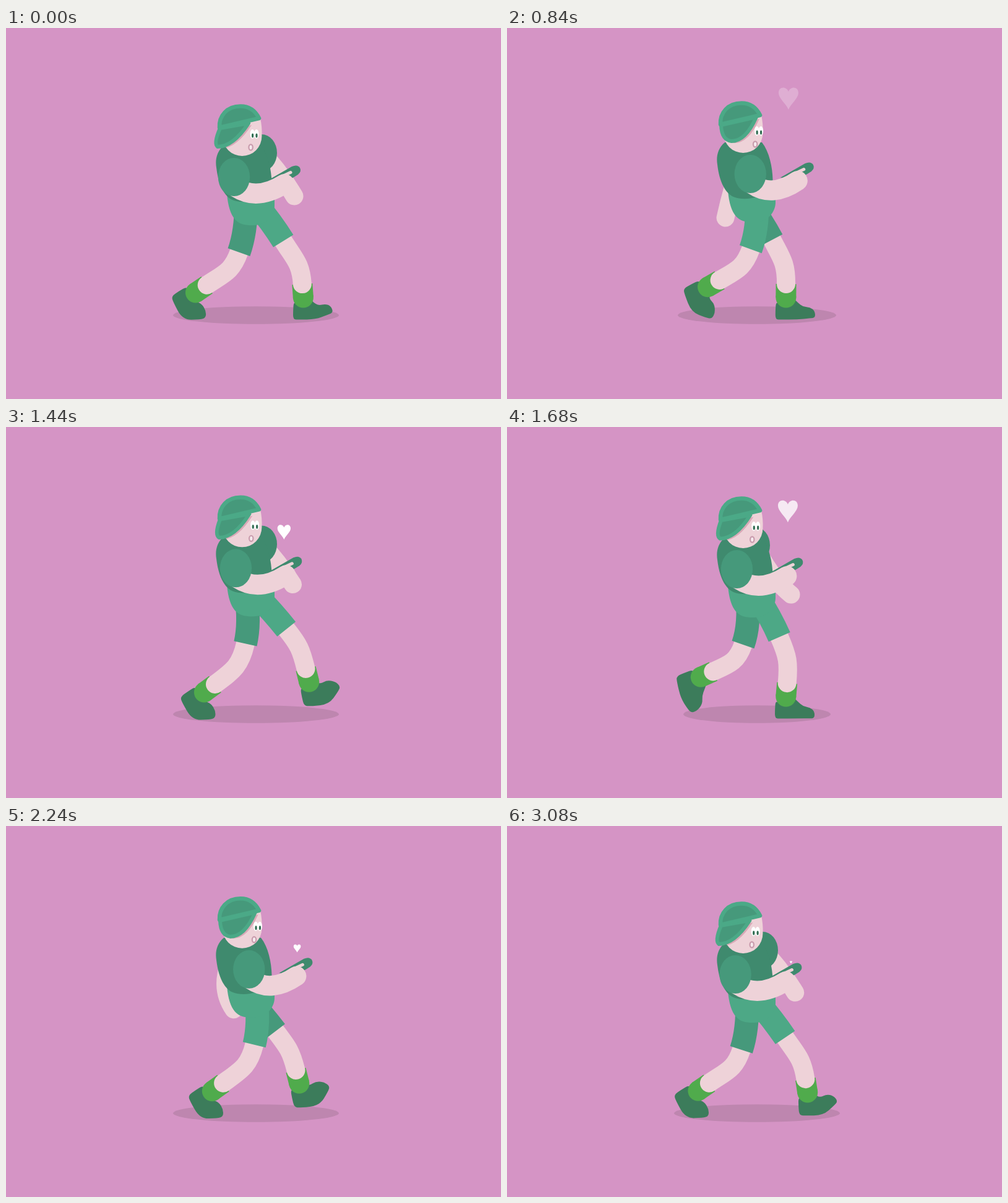
Animation of 800 by 600 pixels, one loop 3120 ms. Source, as an HTML page:

```html
<!DOCTYPE html>
<html lang="en">
<head>
<meta charset="utf-8">
<title>Walking with a phone</title>
<style>
html, body { margin: 0; width: 100%; height: 100%; overflow: hidden; background: #d594c5; }
svg { display: block; width: 800px; height: 600px; }
.line { fill: none; }
.skin { stroke: #eed2d8; stroke-linecap: round; }
.sock { stroke: #50ab4c; stroke-width: 33; }
.cuff { fill: #50ab4c; }
.shoe { fill: #3c7c5b; }
.dark { fill: #3f8a6e; }
.mid { fill: #46997b; }
.light { fill: #4da886; }
</style>
</head>
<body>
<svg viewBox="0 0 800 600">
  <defs>
    <clipPath id="faceClip"><use href="#face"/></clipPath>
  </defs>
  <ellipse id="shadow" cx="404" cy="464.5" ry="14.3" fill="#be86af"/>
  <g class="body">
    <path id="farArm" class="line skin" stroke-width="29"/>
    <ellipse id="farSleeve" class="dark" rx="25" ry="30"/>
  </g>
  <g id="farLeg"></g>
  <g id="nearLeg"></g>
  <g class="body">
    <path class="light" d="M357 268H434V287C434 302 422 319 400 319C376 320 361 312 357 268Z"/>
    <path class="dark" d="M352 190C340 200 338 214 340 226C343 252 352 272 366 278C382 284 400 282 429.500 269V250C429 230 424 205 412 190Z"/>
    <path id="face" fill="#eed2d8" d="M350 158V175A31.7 32 0 0 0 413.4 175C414 165 413 155 411 146Z"/>
    <g clip-path="url(#faceClip)"><path id="flapShade" fill="#d9a9b7" transform="translate(5 3)"/></g>
    <g id="features">
      <g fill="#fff">
        <ellipse cx="398.3" cy="171.5" rx="3.8" ry="7.5"/>
        <ellipse cx="404.8" cy="171.5" rx="3.8" ry="7.5"/>
      </g>
      <g fill="#2f6b50">
        <ellipse cx="398.6" cy="174" rx="1.6" ry="3.4"/>
        <ellipse cx="405" cy="174" rx="1.6" ry="3.4"/>
      </g>
      <ellipse cx="395.6" cy="193" rx="3.2" ry="4.6" fill="#f6eaee" stroke="#c99cad" stroke-width="2.2"/>
    </g>
    <path id="flap" class="mid" stroke="#4ba987" stroke-width="6" stroke-linejoin="round"/>
    <path class="mid" stroke="#4ba987" stroke-width="6.5" stroke-linejoin="round" d="M345 161C344 142 357 126.500 379 126.500C395 126.500 404 136 409 146Z"/>
    <path id="phone" class="dark" d="M422 247L462 224Q471 220 475 226Q478 232 472 237Q460 245 448 249Z"/>
    <path id="nearArm" class="line skin" stroke-width="32"/>
    <path id="thumb" class="line skin" stroke-width="5" d="M444 241L460 233.500"/>
    <ellipse id="nearSleeve" class="mid" cy="241" rx="25.7" ry="31"/>
  </g>
  <path id="heart" fill="#fff" d="M0 18C-4 8-16 0-16-9C-16-20-3-20 0-11C3-20 16-20 16-9C16 0 4 8 0 18Z"/>
</svg>
<script>
const LOOP = 3120, CYCLE = LOOP / 2, STEP = CYCLE / 2, FRAME = 40;
const $ = id => document.getElementById(id);
const set = (el, attrs) => { for (const k in attrs) el.setAttribute(k, attrs[k]); };
const mix = (a, b, k) => a + (b - a) * k;
const clamp = v => Math.max(0, Math.min(1, v));
const ramp = (v, from, to) => clamp((v - from) / (to - from));
const rad = deg => deg * Math.PI / 180;
const pt = (x, y) => x.toFixed(2) + ' ' + y.toFixed(2);

// Smooth periodic curve without overshoot through a few poses [time, ...values].
function track(period, poses) {
  const n = poses.length;
  const pose = i => poses[(i + n) % n];
  const gap = i => (pose(i + 1)[0] - pose(i)[0] + period) % period;
  const slope = (i, c) => (pose(i + 1)[c] - pose(i)[c]) / gap(i);
  const tangent = (i, c) => {
    const a = slope(i - 1, c), b = slope(i, c);
    return a * b > 0 ? 2 * a * b / (a + b) : 0;
  };
  return time => {
    const t = time % period;
    let i = n - 1;
    while (poses[i][0] > t) i--;
    const w = gap(i), u = (t - poses[i][0]) / w;
    return poses[i].slice(1).map((v, k) =>
      mix(v, pose(i + 1)[k + 1], u * u * (3 - 2 * u)) +
      w * u * (1 - u) * ((1 - u) * tangent(i, k + 1) - u * tangent(i + 1, k + 1)));
  };
}

// The body bounces twice in each step.
const bounce = track(STEP / 2, [[0, 0], [60, -5], [120, -11], [205, -21], [295, -8.5], [350, -1]]);
// Far arm: shoulder x, elbow, hand.
const farSwing = track(CYCLE, [
  [0, 413, 440, 228, 466, 272], [120, 400, 426, 255, 459, 282],
  [680, 376, 338, 262, 368, 306], [840, 384, 364, 262, 353, 312],
  [1080, 409, 440, 245, 385, 305], [1200, 413, 437, 235, 446, 262]]);
// Leg: thigh angle, shin angle, ankle.
const stride = track(CYCLE, [
  [0, 42, 4, 481, 445], [120, 34, -5, 450, 445], [420, 18, -36, 383, 445],
  [680, 1, -54, 326, 434], [780, -6, -56, 315, 433], [900, -2, -66, 321, 408],
  [1080, 56, -81, 393, 372], [1200, 82, -24, 472, 377], [1460, 46, 14, 492, 425]]);

// Flat shoe around the ankle; in the air it swells, and the toe can bend.
const SHOE = [[-17, 12], [-16, -2], [-9, 2], [1, 6], [9, 2], [14, -7], [20, -1], [29, 7],
  [40, 9], [47, 15], [47, 26.5], [38, 26.5], [18, 26.5], [-8, 26.5], [-17, 26.5]];

function shoePath(air, bend) {
  const p = SHOE.map(([x, y]) => {
    const swell = air * Math.sin(Math.PI * (x + 17) / 70);
    const a = rad(bend) * ramp(x, 10, 28), c = Math.cos(a), s = Math.sin(a);
    const dx = x - 18, dy = y + (y > 14 ? 8 : -6) * swell - 18;
    return [18 + dx * c - dy * s, 18 + dx * s + dy * c];
  });
  const half = i => {
    const a = p[i], b = p[(i + 1) % p.length];
    return pt((a[0] + b[0]) / 2, (a[1] + b[1]) / 2);
  };
  return 'M' + half(p.length - 1) + p.map((q, i) => 'Q' + pt(q[0], q[1]) + ' ' + half(i)).join('') + 'Z';
}

function makeLeg(id, color) {
  $(id).innerHTML = '<path class="shoe"/><path class="line sock"/><circle class="cuff" r="16.5"/>' +
    '<path class="line skin" stroke-width="30"/><path class="line" stroke-width="38" stroke="' + color + '"/>';
  const [shoe, sock, cuff, skin, shorts] = $(id).children;
  return (time, shift, lift) => {
    const t = time % CYCLE;
    const [thigh, shin, ankleX, jy] = stride(t);
    const jx = ankleX + shift;

    // The foot follows the shin unless it stands on the ground.
    const air = ramp(t, 420, 640) * (1 - ramp(t, 1470, 1570));
    const foot = -shin * air;
    const beforeStrike = (t + CYCLE / 2 - 1480 + CYCLE) % CYCLE - CYCLE / 2;
    const toeUp = 42 * Math.exp(-((beforeStrike / 100) ** 2));
    const push = Math.max(0, foot) * ramp(jy, 412, 432);

    const ux = Math.sin(rad(shin)), uy = Math.cos(rad(shin));
    const ax = jx - 31 * ux, ay = jy - 31 * uy;
    const cx = jx - 9 * ux, cy = jy - 9 * uy;
    const sx = 400 + shift + 72 * Math.sin(rad(thigh)), sy = 291 + lift + 72 * Math.cos(rad(thigh));
    const hem = rad(mix(thigh, shin, .27)), hx = Math.sin(hem), hy = Math.cos(hem);
    const k = .45 * Math.hypot(ax - sx, ay - sy);

    set(shoe, { d: shoePath(air, -push - toeUp),
      transform: 'translate(' + pt(jx, jy) + ') rotate(' + foot.toFixed(2) + ')' });
    set(sock, { d: 'M' + pt(ax, ay) + 'L' + pt(cx, cy) });
    set(cuff, { cx, cy });
    set(skin, { d: 'M' + pt(sx, sy) + 'C' + pt(sx + k * hx, sy + k * hy) + ' ' +
      pt(ax - k * ux, ay - k * uy) + ' ' + pt(ax, ay) });
    set(shorts, { d: 'M' + pt(404 + shift, 284 + lift) + 'Q' + pt(sx - 35 * hx, sy - 35 * hy) + ' ' + pt(sx, sy) });
  };
}
const nearLeg = makeLeg('nearLeg', '#4da886');
const farLeg = makeLeg('farLeg', '#46997b');

// One heart a second: start x and sideways drift per ms.
const HEARTS = [[465, -.012], [441, .019], [497, -.11], [459, 0]];

function drawHeart(t) {
  const age = t % 1000, [x, drift] = HEARTS[Math.floor(t / 1000)];
  set($('heart'), {
    transform: 'translate(' + pt(x + drift * age, 231.5 - .14 * age) + ') scale(' + Math.min(1, age / 660) + ')',
    opacity: 1 - ramp(age, 620, 910)
  });
}

function draw(t) {
  const [lift] = bounce(t);
  const turn = Math.sin(Math.PI * (t % CYCLE) / CYCLE) ** 1.5;
  set($('shadow'), { rx: Math.min(134, 89 + .15 * Math.abs(t % STEP - 320)) });
  document.querySelectorAll('.body').forEach(g => set(g, { transform: 'translate(0 ' + lift + ')' }));

  const [fx, ex, ey, hx, hy] = farSwing(t);
  set($('farArm'), { d: 'M' + pt(fx, 202) + 'Q' + pt(ex, ey) + ' ' + pt(hx, hy) });
  set($('farSleeve'), { cx: fx, cy: 202 + 16 * turn * turn });
  farLeg(t + STEP, -16, lift);
  nearLeg(t, 0, lift);

  const between = (x0, y0, x1, y1) => pt(mix(x0, x1, turn), mix(y0, y1, turn)) + ' ';
  const flap = 'M346 162Q' + between(335, 187, 347, 186) + between(342, 192, 363, 188) +
    'Q' + between(367, 192, 386, 188) + between(392, 154, 403, 149) + 'Z';
  set($('flap'), { d: flap });
  set($('flapShade'), { d: flap });
  set($('features'), { transform: 'translate(' + 5.6 * turn + ' 0)' });

  const reach = 'translate(' + 20 * turn + ' 0)';
  set($('phone'), { transform: reach });
  set($('thumb'), { transform: reach });
  set($('nearArm'), { d: 'M' + between(372, 258, 397, 258) + 'Q' + between(406, 280, 429, 280) + between(450, 252, 470, 252) });
  set($('nearSleeve'), { cx: 368.5 + 25 * turn });
  drawHeart(t);
}

const start = performance.now();
function tick() {
  const t = (performance.now() - start) % LOOP;
  draw(Math.floor(t / FRAME) * FRAME);
  requestAnimationFrame(tick);
}
tick();
</script>
</body>
</html>
```
